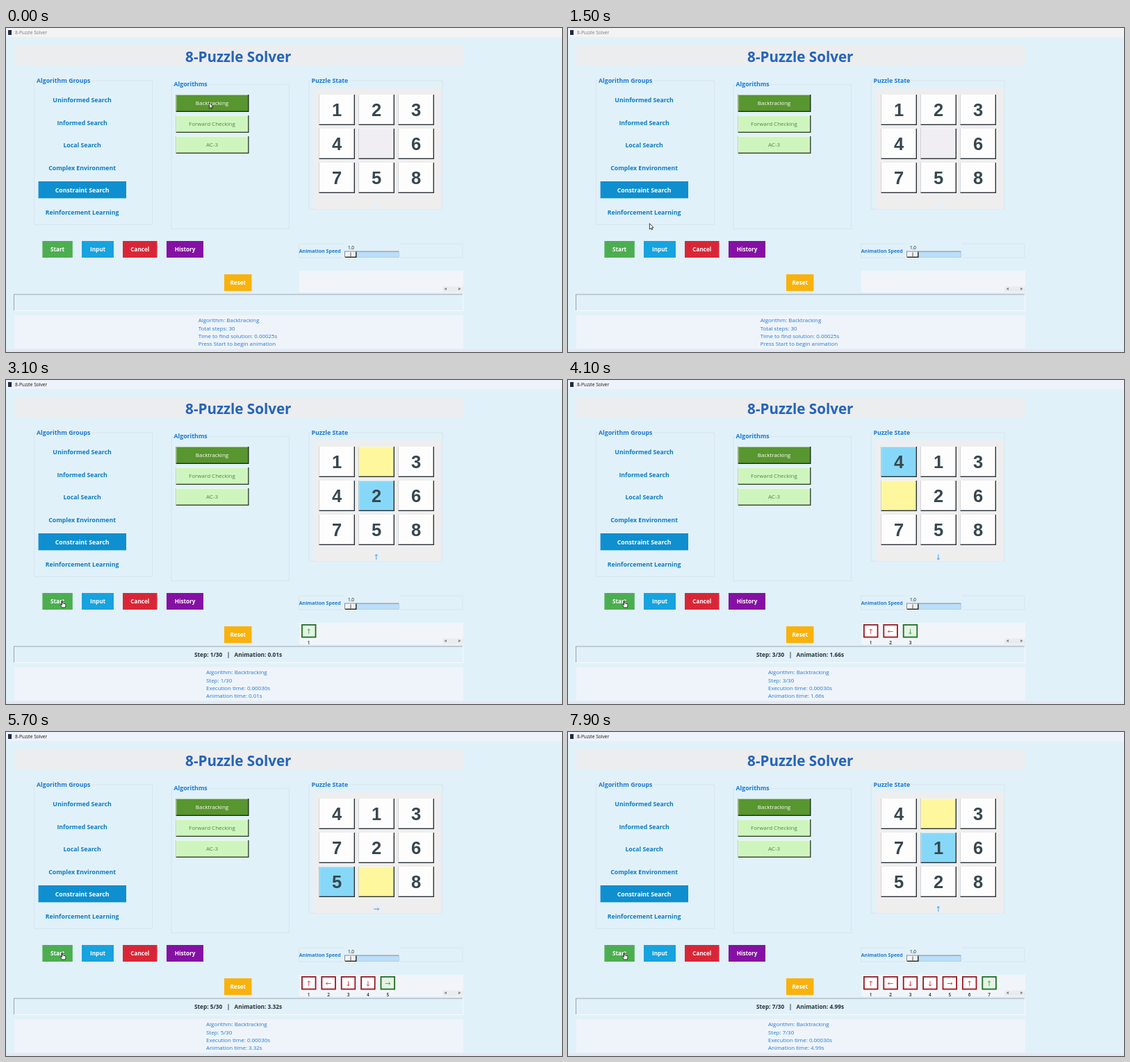
An HTML page with a canvas for the animation above (8 s loop, 800 by 467 pixels).

```html
<!DOCTYPE html>
<html lang="en">
<head>
<meta charset="utf-8">
<title>8-Puzzle Solver</title>
<style>
html, body { margin: 0; width: 100%; height: 100%; overflow: hidden; background: #e1f1fa; }
canvas { display: block; width: 800px; height: 467px; }
</style>
</head>
<body>
<canvas id="stage"></canvas>
<script>
const W = 800, H = 467, LOOP = 8000;
const canvas = document.getElementById('stage');
const ctx = canvas.getContext('2d');
const dpr = window.devicePixelRatio || 1;
canvas.width = W * dpr;
canvas.height = H * dpr;

const UI = '"Open Sans", "Noto Sans", sans-serif';
const DIGITS = '"Liberation Sans", Arial, sans-serif';
const BG = '#e1f1fa', BLUE = '#1976d2', DARK = '#37474f', FRAME = '#d9e4ea';

const MOVE_START = 950, MOVE_END = 1700, PRESS = 1900;
const FIRST_STEP = 2350, STEP_MS = 830;
const MOVES = 'ULDDRUU';
const OFFSET = { U: -3, D: 3, L: -1, R: 1 };
const ANGLE = { U: 0, R: 90, D: 180, L: 270 };
const ELAPSED = ['0.01', '0.84', '1.66', '2.48', '3.32', '4.15', '4.99'];

function rect(x, y, w, h, color) {
  ctx.fillStyle = color;
  ctx.fillRect(x, y, w, h);
}

// y is the middle of the capitals
function text(str, x, y, size, color, { weight = 400, align = 'center', font = UI } = {}) {
  ctx.font = `${weight} ${size}px ${font}`;
  ctx.textAlign = align;
  ctx.fillStyle = color;
  ctx.fillText(str, x, y + size * 0.357);
}

function bold(str, x, y, size, color, align) {
  text(str, x, y, size, color, { weight: 700, align });
}

function box(x, y, w, h, color, line = 1) {
  ctx.strokeStyle = color;
  ctx.lineWidth = line;
  ctx.strokeRect(x + line / 2, y + line / 2, w - line, h - line);
}

function raised(x, y, w, h, fill, edge) {
  rect(x, y, w, h, edge);
  rect(x, y, w - 1.4, h - 1.4, fill);
  rect(x, y, w - 1.4, 1, 'rgba(255,255,255,0.5)');
  rect(x, y + 1, 1, h - 2.4, 'rgba(255,255,255,0.5)');
}

function group(label, x, y, w, h) {
  box(x, y, w, h, FRAME);
  ctx.font = `700 8.75px ${UI}`;
  rect(x + 3, y - 4, ctx.measureText(label).width + 3, 9, BG);
  bold(label, x + 4, y, 8.75, BLUE, 'left');
}

function button(label, x, y, w, h, color, ink = '#fff') {
  rect(x, y, w, h, color);
  bold(label, x + w / 2, y + h / 2, 8.1, ink);
}

function arrow(x, y, dir, size, color) {
  ctx.save();
  ctx.translate(x, y);
  ctx.rotate(ANGLE[dir] * Math.PI / 180);
  ctx.strokeStyle = color;
  ctx.lineWidth = 0.8;
  ctx.beginPath();
  ctx.moveTo(0, size / 2);
  ctx.lineTo(0, -size / 2);
  ctx.moveTo(-1.9, -size / 2 + 2.1);
  ctx.lineTo(0, -size / 2);
  ctx.lineTo(1.9, -size / 2 + 2.1);
  ctx.stroke();
  ctx.restore();
}

function polygon(points, fill, stroke) {
  ctx.beginPath();
  points.forEach(([x, y]) => ctx.lineTo(x, y));
  ctx.closePath();
  ctx.fillStyle = fill;
  ctx.fill();
  if (stroke) {
    ctx.strokeStyle = stroke;
    ctx.lineWidth = 0.8;
    ctx.stroke();
  }
}

function pointer(x, y, hand) {
  ctx.save();
  ctx.translate(x, y);
  const shape = hand
    ? [[0, 0], [1.4, 0], [1.4, 3.6], [5, 4.4], [5.6, 6], [4.8, 9.6], [0, 9.6], [-2.6, 6], [-1.6, 5.2], [0, 6.4]]
    : [[0, 0], [0, 8.4], [1.9, 6.7], [3.1, 9.3], [4.3, 8.7], [3.2, 6.2], [5.7, 6.1]];
  polygon(shape, '#fff', '#111');
  ctx.restore();
}

function titleBar(active) {
  rect(0, 0, W, 13, active ? '#eef2fa' : '#f3f3f5');
  rect(3, 3, 5, 7, '#1d2a4a');
  text('8-Puzzle Solver', 13, 6.7, 6.6, active ? '#111' : '#777', { align: 'left' });
}

function algorithms() {
  group('Algorithm Groups', 40, 75.5, 171, 208.5);
  ['Uninformed Search', 'Informed Search', 'Local Search', 'Complex Environment',
    'Constraint Search', 'Reinforcement Learning'].forEach((name, i) => {
    const chosen = i === 4, y = 104.2 + i * 32.4;
    if (chosen) rect(46.6, 221, 126.4, 24.4, '#0f8fcf');
    bold(name, 109.6, y, 8.75, chosen ? '#fff' : '#0a7bc2');
  });

  group('Algorithms', 237.5, 81, 170.5, 209);
  ['Backtracking', 'Forward Checking', 'AC-3'].forEach((name, i) => {
    const y = 96 + i * 30;
    raised(244.6, y, 104.9, 25, i ? '#cff5bf' : '#58962f', i ? '#33452c' : '#1c3010');
    text(name, 296.5, y + 12.5, 8, i ? '#4b8a3b' : '#fff');
  });
}

function boardAt(step) {
  const cells = [1, 2, 3, 4, 0, 6, 7, 5, 8];
  let blank = 4, moved = -1;
  for (const m of MOVES.slice(0, step)) {
    moved = blank;
    blank += OFFSET[m];
    cells[moved] = cells[blank];
    cells[blank] = 0;
  }
  return { cells, moved };
}

function puzzle(step) {
  group('Puzzle State', 435.5, 75.5, 193, 186);
  rect(443, 87, 184, 174, '#eeeeef');
  const { cells, moved } = boardAt(step);
  cells.forEach((n, i) => {
    const x = 450.5 + (i % 3) * 57, y = 96 + Math.floor(i / 3) * 49;
    let fill = '#fdfdfd';
    if (i === moved) fill = '#87d8f8';
    else if (!n) fill = step ? '#fff79d' : '#f0eef2';
    raised(x, y, 51.5, 44, fill, '#2b3136');
    if (n) text(n, x + 25.7, y + 21.8, 25.5, DARK, { weight: 700, font: DIGITS });
  });
  rect(530, 249, 6, 11, '#e6f0f7');
  if (step) arrow(532.8, 255.2, MOVES[step - 1], 7.6, '#1c8fe0');
}

function speed() {
  box(421, 310.5, 236.5, 21, FRAME);
  rect(485.5, 309, 81.5, 23, BG);
  bold('Animation Speed', 421.7, 321.8, 7.05, BLUE, 'left');
  text('1.0', 496.5, 316.7, 6.4, '#111');
  rect(487, 321.5, 79, 9.5, '#f4f8fb');
  rect(487, 321.5, 78.5, 9, '#7d8a94');
  rect(488, 322.5, 77.5, 8, '#bbdefb');
  raised(488, 322.5, 16.5, 8.5, '#f2f3f4', '#222');
  rect(495.5, 323.5, 1, 6, '#555');
}

function history(step) {
  rect(422, 350, 236, 31, '#f1f5fa');
  rect(628, 372.5, 30, 7.5, '#ebebec');
  polygon([[630.5, 376], [634, 373.9], [634, 378.1]], '#858585');
  polygon([[654.5, 376], [651, 373.9], [651, 378.1]], '#858585');
  for (let i = 0; i < step; i++) {
    const now = i === step - 1, x = 435.7 + i * 28.4;
    rect(x - 10.7, 352, 21.4, 19.5, now ? '#e4f4e4' : '#fff');
    box(x - 10.7, 352, 21.4, 19.5, now ? '#1f6e24' : '#9a1620', 1.8);
    arrow(x, 362.5, MOVES[i], 7.2, now ? '#2e9a36' : '#dc2028');
    text(i + 1, x, 378.2, 6.5, '#222', { weight: 600 });
  }
}

function log(lines, x) {
  const single = lines.length === 1;
  rect(12, 414, 646, single ? 14 : 48, '#eff4fa');
  lines.forEach((line, i) =>
    text(line, x, 421.5 + i * 11.3, 7.95, '#2079d0', { align: single ? 'center' : 'left' }));
}

function status(t, step) {
  rect(11, 383.5, 647, 24.5, '#f6fafc');
  rect(11, 383.5, 646, 23.5, '#9aa5ac');
  rect(12, 384.5, 645, 22.5, BG);
  if (step) {
    const time = ELAPSED[step - 1] + 's', count = `Step: ${step}/30`;
    bold(`${count}\u00a0\u00a0\u00a0|\u00a0\u00a0\u00a0Animation: ${time}`, 334, 396.2, 8.25, '#263238');
    log(['Algorithm: Backtracking', count, 'Execution time: 0.00030s', 'Animation time: ' + time], 288);
  } else if (t >= PRESS) {
    log(['Bắt đầu chạy animation lời giải'], 334);
  } else {
    log(['Algorithm: Backtracking', 'Total steps: 30',
      'Time to find solution: 0.00025s', 'Press Start to begin animation'], 276.7);
  }
}

function draw(t) {
  const step = t < FIRST_STEP ? 0 : Math.min(7, 1 + Math.floor((t - FIRST_STEP) / STEP_MS));
  const pressed = t >= PRESS && !step;
  ctx.setTransform(dpr, 0, 0, dpr, 0, 0);
  rect(0, 0, W, H, BG);
  titleBar(t >= PRESS);
  rect(0, 463.5, W, 3.5, '#e4e6f2');

  rect(12, 25, 646, 30, '#ecedef');
  bold('8-Puzzle Solver', 334.3, 41.3, 20.6, '#2265bd');

  algorithms();
  puzzle(step);
  button('Start', 52.4, 307, 43.4, 24, pressed ? '#74c276' : '#4cae50', pressed ? '#d8f2d8' : '#fff');
  button('Input', 109, 307, 46, 24, '#16a3e0');
  button('Cancel', 168, 307, 49.5, 24, '#d92637');
  button('History', 231, 307, 53, 24, '#8510a4');
  button('Reset', 314, 355, 39.5, 24, '#f9b20c');
  speed();
  history(step);
  status(t, step);

  const p = Math.min(1, Math.max(0, (t - MOVE_START) / (MOVE_END - MOVE_START)));
  const ease = p * p * (3 - 2 * p);
  pointer(292.5 + (80.5 - 292.5) * ease, 107.7 + (318.3 - 107.7) * ease, p === 1);
}

function frame() {
  draw(performance.now() % LOOP);
  requestAnimationFrame(frame);
}
frame();
</script>
</body>
</html>
```
